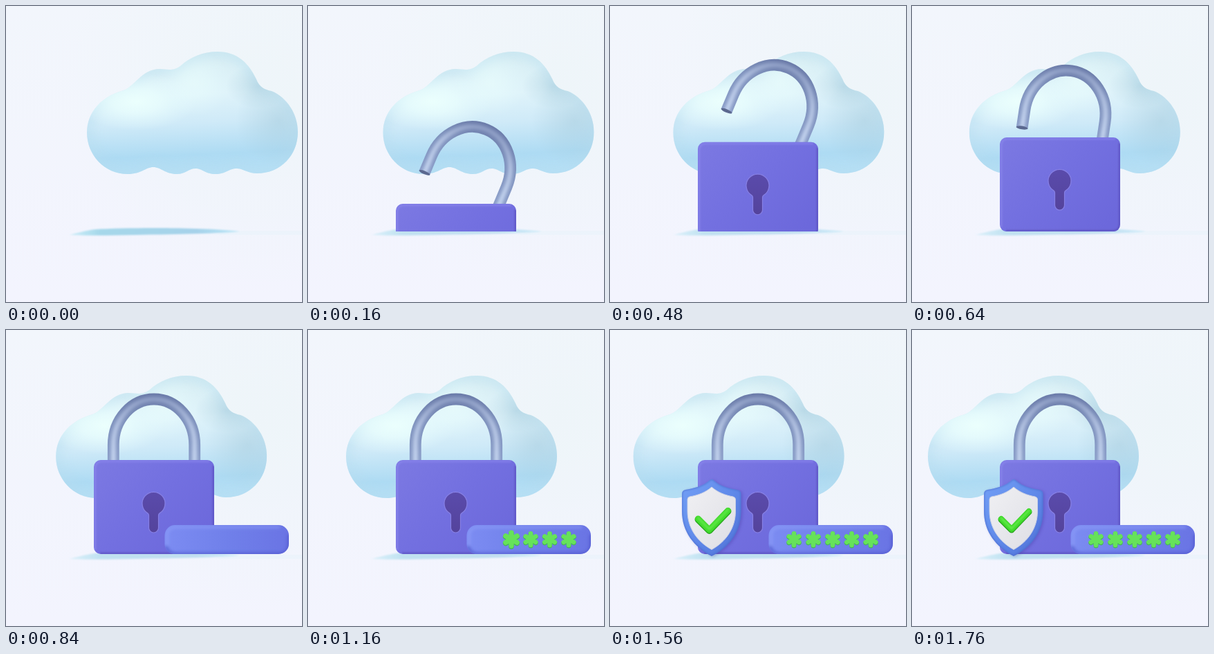
An HTML page for the animation above (1800 ms loop, 428 by 428 pixels).

```html
<!DOCTYPE html>
<html lang="en">
<head>
<meta charset="utf-8">
<title>Cloud security</title>
<style>
  html, body { margin: 0; width: 100%; height: 100%; overflow: hidden; background: #f3f5fd; }
  svg { display: block; width: 100vw; height: 100vh; }
</style>
</head>
<body>
<svg viewBox="0 0 428 428">
  <defs>
    <linearGradient id="sky" x1="0" y1="0" x2="0" y2="1">
      <stop offset="0" stop-color="#f2f6fc"/>
      <stop offset="1" stop-color="#f3f4fe"/>
    </linearGradient>
    <radialGradient id="haze" cx=".85" cy=".3" r=".65">
      <stop offset="0" stop-color="#eef5f9"/>
      <stop offset="1" stop-color="#eef5f9" stop-opacity="0"/>
    </radialGradient>
    <linearGradient id="ground">
      <stop offset="0" stop-color="#a9e4f2" stop-opacity=".5"/>
      <stop offset=".18" stop-color="#a6d8ea"/>
      <stop offset=".75" stop-color="#a6d2ea"/>
      <stop offset="1" stop-color="#a4e0f4" stop-opacity=".7"/>
    </linearGradient>

    <linearGradient id="cloudBase" gradientUnits="userSpaceOnUse" x1="262" y1="66" x2="270" y2="243">
      <stop offset="0" stop-color="#d8eef3"/>
      <stop offset=".35" stop-color="#dff3fa"/>
      <stop offset=".58" stop-color="#cfeaf8"/>
      <stop offset=".84" stop-color="#aedbf3"/>
      <stop offset="1" stop-color="#b6e0f6"/>
    </linearGradient>
    <radialGradient id="glow">
      <stop offset="0" stop-color="#ebfffd"/>
      <stop offset=".4" stop-color="#e8fdfd" stop-opacity=".8"/>
      <stop offset="1" stop-color="#e4fafd" stop-opacity="0"/>
    </radialGradient>
    <radialGradient id="dim">
      <stop offset="0" stop-color="#a3c9da" stop-opacity=".65"/>
      <stop offset="1" stop-color="#a3c9da" stop-opacity="0"/>
    </radialGradient>
    <path id="cloudShape" d="M117 183C117 152 140 130 170 122C186 117 196 91 222 91C232 91 241 95 252 87C266 74 284 66 306 66C335 66 352 84 362 106C366 117 374 121 384 123C406 132 422 156 422 182C422 216 397 242 363 242C350 242 342 235 334 235C322 235 318 243 303 243C288 243 284 235 274 235C264 235 260 243 247 243C230 243 224 233 213 233C202 233 196 243 176 243C142 243 117 215 117 183Z"/>
    <clipPath id="cloudClip"><use href="#cloudShape"/></clipPath>

    <linearGradient id="steel" gradientUnits="userSpaceOnUse" x1="214" y1="92" x2="214" y2="192">
      <stop offset="0" stop-color="#6a7aa8"/>
      <stop offset=".4" stop-color="#7f92bd"/>
      <stop offset="1" stop-color="#8a9dc8"/>
    </linearGradient>
    <linearGradient id="shine" gradientUnits="userSpaceOnUse" x1="214" y1="96" x2="214" y2="180">
      <stop offset="0" stop-color="#8a9ac2"/>
      <stop offset=".5" stop-color="#b0c0e0"/>
      <stop offset="1" stop-color="#c0d0ec"/>
    </linearGradient>
    <linearGradient id="body" x1="0" y1="0" x2="1" y2=".8">
      <stop offset="0" stop-color="#7c79e2"/>
      <stop offset=".5" stop-color="#7370e0"/>
      <stop offset="1" stop-color="#6c68db"/>
    </linearGradient>
    <linearGradient id="hole" x1="0" y1="0" x2="0" y2="1">
      <stop offset="0" stop-color="#5a4bab"/>
      <stop offset="1" stop-color="#54439c"/>
    </linearGradient>
    <linearGradient id="bar" x1="0" y1="0" x2="1" y2="0">
      <stop offset="0" stop-color="#7c8cf2"/>
      <stop offset=".5" stop-color="#7080ea"/>
      <stop offset="1" stop-color="#6a74e4"/>
    </linearGradient>
    <linearGradient id="rim" x1="0" y1="0" x2="1" y2="1">
      <stop offset="0" stop-color="#73a0f6"/>
      <stop offset=".5" stop-color="#608aea"/>
      <stop offset="1" stop-color="#4f70d6"/>
    </linearGradient>
    <linearGradient id="plate" x1="0" y1="0" x2="1" y2="1">
      <stop offset="0" stop-color="#f0f0f3"/>
      <stop offset="1" stop-color="#dedee5"/>
    </linearGradient>

    <rect id="bodyShape" x="127" y="188" width="174" height="136" rx="10"/>
    <rect id="barShape" x="229.5" y="282" width="179.5" height="42" rx="15"/>
    <path id="shieldShape" d="M143 218Q147 214 151 218C160 226 171 229 184 231Q189.500 232 189.500 237V262C189.500 292 172 315 147 327C122 314 104 292 104 262V237Q104 232 109 231C121 229 134 226 143 218Z"/>
    <path id="arch" d="M155.300 193V166A58.700 66 0 0 1 272.700 166V218"/>
    <path id="tick" d="M129 273L144 288L169 262"/>
    <path id="star" d="M0-8.400V8.400M-7.300-4.200L7.300 4.200M-7.300 4.200L7.300-4.200"/>

    <clipPath id="bodyClip"><use href="#bodyShape"/></clipPath>
    <clipPath id="barClip"><use href="#barShape"/></clipPath>
    <clipPath id="shieldClip"><use href="#shieldShape"/></clipPath>
    <clipPath id="floor"><path d="M0 0H428V326H0Z"/></clipPath>
    <filter id="soft1" x="-20%" y="-20%" width="140%" height="140%"><feGaussianBlur stdDeviation="1.3"/></filter>
    <filter id="soft2" x="-20%" y="-20%" width="140%" height="140%"><feGaussianBlur stdDeviation="2.2"/></filter>
    <filter id="soft8" x="-20%" y="-20%" width="140%" height="140%"><feGaussianBlur stdDeviation="8"/></filter>
  </defs>

  <rect width="428" height="428" fill="url(#sky)"/>
  <rect width="428" height="428" fill="url(#haze)"/>
  <path d="M330 325H428V331H300Z" fill="#e9f4fc" opacity=".6"/>
  <path id="shadow" d="M91 331C104 328 114 325 128 323C180 320 290 320 338 326C310 329 250 330 190 331C150 332 110 332 91 331Z" fill="url(#ground)" filter="url(#soft1)"/>

  <g id="cloud">
    <use href="#cloudShape" fill="url(#cloudBase)"/>
    <g clip-path="url(#cloudClip)" fill="none">
      <use href="#cloudShape" stroke="#b5dcef" stroke-width="13" opacity=".55" filter="url(#soft8)"/>
      <ellipse cx="188" cy="138" rx="88" ry="42" fill="url(#glow)"/>
      <ellipse cx="272" cy="112" rx="54" ry="48" fill="url(#glow)" opacity=".55"/>
      <ellipse cx="394" cy="166" rx="62" ry="66" fill="url(#dim)" opacity=".75"/>
      <ellipse cx="364" cy="116" rx="46" ry="32" fill="url(#dim)" opacity=".75"/>
    </g>
  </g>

  <g clip-path="url(#floor)">
    <g id="lock">
      <g id="shackle" fill="none">
        <use href="#arch" stroke="url(#steel)" stroke-width="16.8"/>
        <use href="#arch" stroke="url(#shine)" stroke-width="7" filter="url(#soft2)"/>
        <ellipse cx="155.300" cy="192" rx="8.400" ry="2.400" fill="#5b688f"/>
      </g>
      <use href="#bodyShape" fill="url(#body)"/>
      <g clip-path="url(#bodyClip)" fill="none" filter="url(#soft1)">
        <path d="M129 318V200Q129 190 139 190H294" stroke="#8c88ee" stroke-width="3" opacity=".6"/>
        <path d="M300 196V314Q300 323 290 323H136" stroke="#5a50bd" stroke-width="3" opacity=".7"/>
      </g>
      <path d="M206.500 268Q206.500 266 205 265A16.500 16.500 0 1 1 222 265Q220.500 266 220.500 268V286A7 7 0 0 1 206.500 286Z" fill="url(#hole)" stroke="#8780e4" stroke-width="1.2"/>
    </g>
  </g>

  <g id="pill">
    <use href="#barShape" fill="url(#bar)"/>
    <g clip-path="url(#barClip)" fill="none" filter="url(#soft2)">
      <path d="M231 312Q234 324 246 324H394Q409 324 409 309V296" stroke="#4f57cc" stroke-width="5" opacity=".7"/>
      <path d="M233 312V297Q233 285 246 285H396" stroke="#8f9ef8" stroke-width="4" opacity=".6"/>
    </g>
  </g>
  <g id="stars"></g>

  <g id="shield">
    <use href="#shieldShape" x="2" y="1" fill="#4338a0" opacity=".35" filter="url(#soft2)"/>
    <use href="#shieldShape" fill="url(#rim)"/>
    <g clip-path="url(#shieldClip)" fill="none">
      <use href="#shieldShape" stroke="#4463c4" stroke-width="2.500" opacity=".5" filter="url(#soft1)"/>
    </g>
    <path d="M147 227C156 235 167 239 178 241Q181.500 242 181.500 245V262C181.500 286 168 306 147 317.500C126 306 112 286 112 262V245Q112 242 115 241C127 239 138 235 147 227Z" fill="url(#plate)" stroke="#c9cfe4" stroke-width="1"/>
  </g>
  <g id="check" fill="none" stroke-linecap="round" stroke-linejoin="round">
    <use href="#tick" y="1" stroke="#27a51c" stroke-width="9"/>
    <use href="#tick" stroke="#41d92c" stroke-width="8"/>
    <use href="#tick" y="-1" stroke="#64ec4c" stroke-width="2.500" filter="url(#soft1)"/>
  </g>
</svg>
<script>
const LOOP = 1800, STEP = 40;
const el = id => document.getElementById(id);
const parts = {};
for (const id of ["shadow", "cloud", "lock", "shackle", "pill", "stars", "shield", "check"]) parts[id] = el(id);

const starX = [377, 349.5, 322, 294, 266];
parts.stars.innerHTML = starX.map(() => `<g stroke-linecap="round">
  <use href="#star" y="1" stroke="#46b35c" stroke-width="7"/>
  <use href="#star" stroke="#66e25a" stroke-width="6.4"/></g>`).join("");
const stars = [...parts.stars.children];

// Linear interpolation through [time, value] pairs
function track(keys, t) {
  if (t <= keys[0][0]) return keys[0][1];
  for (let i = 1; i < keys.length; i++) {
    const [a, u] = keys[i - 1], [b, v] = keys[i];
    if (t <= b) return u + (v - u) * (t - a) / (b - a);
  }
  return keys[keys.length - 1][1];
}
const ramp = (a, b, t) => Math.min(1, Math.max(0, (t - a) / (b - a)));
const smooth = p => p * p * (3 - 2 * p);
const place = (node, value) => node.setAttribute("transform", value);

function scaleAt(node, x, y, s) {
  node.style.display = s > 0 ? "" : "none";
  place(node, `translate(${x} ${y}) scale(${s}) translate(${-x} ${-y})`);
}

function draw(t) {
  place(parts.cloud, `translate(${-t * 94 / 1760} 0)`);
  parts.shadow.style.opacity = 1 - 0.35 * ramp(40, 160, t);

  const drop = Math.max(0, 315.6 * Math.exp(-t / 138) - 1);
  place(parts.lock, `translate(0 ${drop})`);
  const open = 1 - smooth(ramp(500, 740, t));
  place(parts.shackle, `translate(${21 * open} ${-24 * open}) rotate(${22.7 * open} 214 160)`);

  const grow = 1 - (1 - ramp(640, 840, t)) ** 2;
  scaleAt(parts.pill, 319.5, 303, grow);

  stars.forEach((star, i) => {
    const at = 880 + 80 * i;
    const s = track([[at, 0], [at + 40, 1.12], [at + 80, 1]], t);
    star.style.display = s > 0 ? "" : "none";
    place(star, `translate(${starX[i]} 302.5) scale(${s})`);
  });

  scaleAt(parts.shield, 147, 272, track([[1180, 0], [1280, 1.12], [1340, 1]], t));
  scaleAt(parts.check, 149, 274.5, track([[1320, 0], [1360, 0.14], [1520, 1.12], [1640, 1]], t));
}

const start = performance.now();
function tick() {
  const t = (performance.now() - start) % LOOP;
  draw(Math.floor(t / STEP) * STEP);
  requestAnimationFrame(tick);
}
tick();
</script>
</body>
</html>
```
